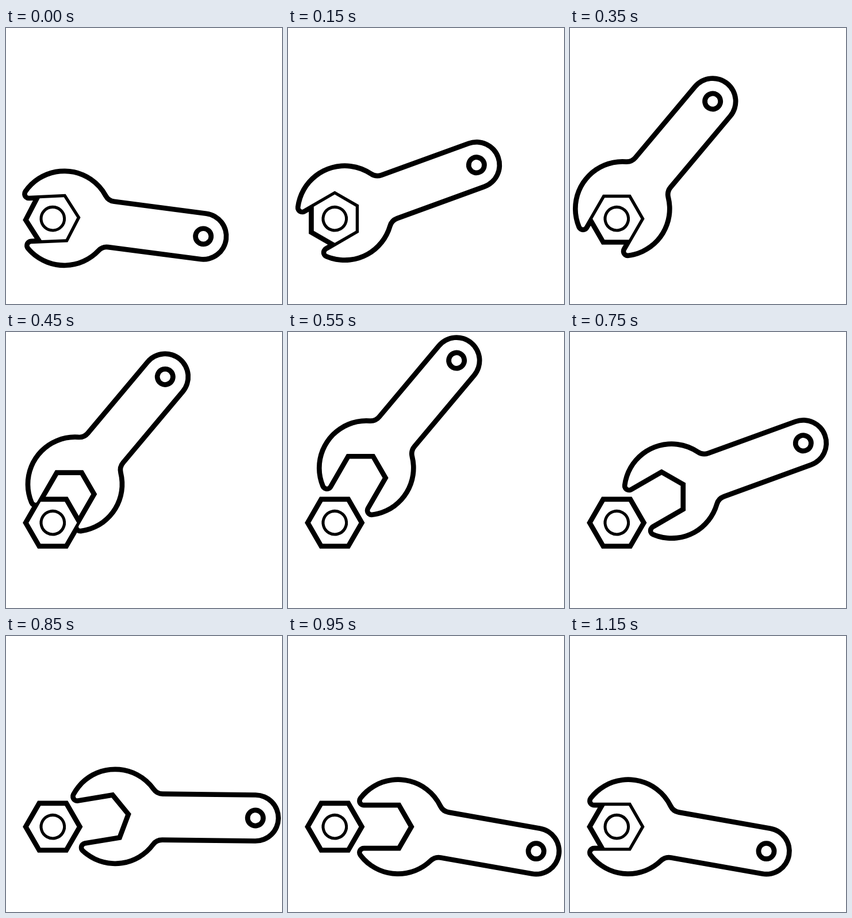
These frames come from a looping animation (480x480 px, 1.2 s). An HTML page with a canvas:

```html
<!DOCTYPE html>
<html lang="en">
<head>
<meta charset="utf-8">
<title>Wrench and nut</title>
<style>
  html, body { margin: 0; width: 100%; height: 100%; overflow: hidden; background: #fff; }
  canvas { display: block; width: 100vw; height: 100vh; object-fit: contain; }
</style>
</head>
<body>
<canvas id="stage" width="480" height="480"></canvas>
<script>
const ctx = document.getElementById('stage').getContext('2d');
const { PI, sqrt, atan2, cos, sin } = Math;

const LOOP = 1200, STEP = 50;
const NUT = { x: 81.3, y: 331.7, apothem: 40.8 };
const HALF = 4.35;       // half the outline width
const SLIDE = 90;        // how far the wrench pulls off the nut

// Wrench geometry, measured from the nut centre
const HEAD = { x: 20, r: 82 };
const END = { x: 260.2, y: 42.4, r: 40 };
const TIP = 7.5, SLOT = 37.5, FILLET = 20;

const clamp = v => Math.min(1, Math.max(0, v));
const smooth = v => v * v * (3 - 2 * v);

// Cubic bezier easing (1/3, 0, 5/6, 5/6): soft start, abrupt stop
function softStart(x) {
  let lo = 0, hi = 1;
  for (let i = 0; i < 24; i++) {
    const s = (lo + hi) / 2, r = 1 - s;
    if (s * r * r + 2.5 * r * s * s + s * s * s < x) lo = s; else hi = s;
  }
  return 2.5 * (1 - lo) * lo * lo + lo * lo * lo;
}

function pose(t) {
  if (t >= 1150) t -= LOOP;
  const turn = smooth(clamp((t + 50) / 400));
  const back = smooth(clamp((t - 550) / 400));
  const off = t < 750 ? clamp((550 - t) / 200) : clamp((t - 950) / 200);
  return {
    nut: -turn * PI / 3,
    wrench: (back - turn) * PI / 3,
    slide: SLIDE * (1 - softStart(off))
  };
}

function hexagon(apothem) {
  const r = apothem / cos(PI / 6);
  ctx.beginPath();
  for (let i = 0; i < 6; i++) ctx.lineTo(r * cos(i * PI / 3), r * sin(i * PI / 3));
  ctx.closePath();
}

// Wrench contour, grown outwards by o
function wrench(o) {
  const tilt = atan2(END.y, END.x - HEAD.x);
  const fv = END.r + FILLET, fd = HEAD.r + FILLET;
  const spread = atan2(fv, sqrt(fd * fd - fv * fv));
  const ty = SLOT + TIP, td = HEAD.r - TIP;
  const tw = sqrt(td * td - ty * ty), tx = HEAD.x - tw;
  const ta = atan2(ty, tw);
  const ap = SLOT - o, hr = ap / cos(PI / 6);
  const up = tilt - spread, down = tilt + spread;

  ctx.beginPath();
  ctx.arc(tx, -ty, TIP + o, PI / 2, PI + ta);
  ctx.arc(HEAD.x, 0, HEAD.r + o, PI + ta, up + 2 * PI);
  ctx.arc(HEAD.x + fd * cos(up), fd * sin(up), FILLET - o, up + PI, tilt + PI / 2, true);
  ctx.arc(END.x, END.y, END.r + o, tilt - PI / 2, tilt + PI / 2);
  ctx.arc(HEAD.x + fd * cos(down), fd * sin(down), FILLET - o, tilt - PI / 2, down - PI, true);
  ctx.arc(HEAD.x, 0, HEAD.r + o, down, PI - ta);
  ctx.arc(tx, ty, TIP + o, PI - ta, 1.5 * PI);
  ctx.lineTo(hr / 2, ap);
  ctx.lineTo(hr, 0);
  ctx.lineTo(hr / 2, -ap);
  ctx.closePath();
}

function ring(x, y, r, width) {
  ctx.beginPath();
  ctx.arc(x, y, r, 0, 2 * PI);
  ctx.lineWidth = width;
  ctx.stroke();
}

function place(angle, slide, paint) {
  ctx.save();
  ctx.translate(NUT.x, NUT.y);
  ctx.rotate(angle);
  ctx.translate(slide, 0);
  paint();
  ctx.restore();
}

function draw(t) {
  const p = pose(t);
  ctx.fillStyle = '#fff';
  ctx.fillRect(0, 0, 480, 480);
  ctx.strokeStyle = '#000';

  // Both dark shapes first, so the white bodies trim each other's outline
  for (const [color, o] of [['#000', HALF], ['#fff', -HALF]]) {
    ctx.fillStyle = color;
    place(p.wrench, p.slide, () => { wrench(o); ctx.fill(); });
    place(p.nut, 0, () => { hexagon(NUT.apothem + o); ctx.fill(); });
  }
  place(p.wrench, p.slide, () => ring(END.x, END.y, 13.6, 2 * HALF));
  place(p.nut, 0, () => ring(0, 0, 20.3, 5.1));
}

const start = performance.now();
function tick() {
  const t = (performance.now() - start) % LOOP;
  draw(Math.floor(t / STEP) * STEP);
  requestAnimationFrame(tick);
}
tick();
</script>
</body>
</html>
```
